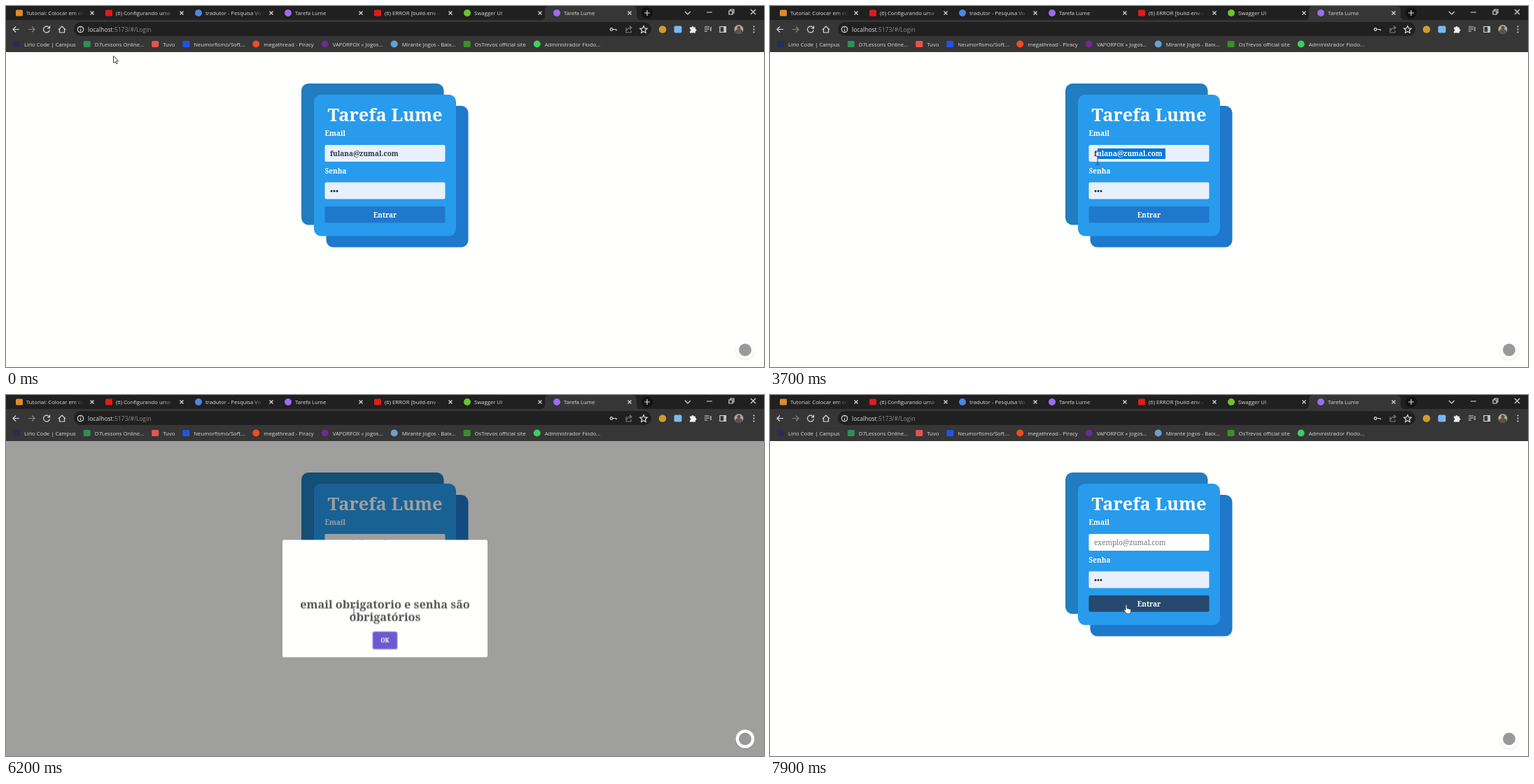
These frames come from a looping animation (1083 by 517 pixels, 8000 ms). An HTML page:

```html
<!DOCTYPE html>
<html lang="pt-BR">
<head>
<meta charset="utf-8">
<title>Login</title>
<style>
  html, body { margin: 0; width: 100%; height: 100%; overflow: hidden; background: #fffffd; }
  #stage { position: relative; width: 1083px; height: 517px; overflow: hidden; }
  #stage > * { position: absolute; left: 0; top: 0; }
  .ui { font: 7.7px "Open Sans", sans-serif; fill: #dcdcdc; }
  .line { fill: none; stroke: #dadada; stroke-width: 1.2; }
  .dim { stroke-opacity: .5; }
  .form { font: 600 10px "Noto Serif", serif; fill: #fff; }
  .form .title { font-size: 25.4px; text-anchor: middle; }
  .form .value { fill: #2f3540; }
  .form .hint { fill: #757575; font-weight: 500; }
  #enter { fill: #1f78cc; }
  #enter.hover { fill: #25496f; }
  #stage > #shade { top: 66px; width: 1083px; height: 451px; background: #000; opacity: 0; }
  #stage > #modal {
    left: 368px; top: 192px; width: 347px; height: 199px;
    border-radius: 3px; background: #fffffe; opacity: 0;
    font: 600 19.2px/22px "Noto Serif", serif; color: #545454; text-align: center;
  }
  #modal > * { position: absolute; }
  #icon { left: 141px; top: 22px; opacity: 0; }
  #mark { transform-origin: 32px 29px; }
  #message { left: 0; right: 0; top: 98px; white-space: nowrap; }
  #ok {
    left: 153px; top: 156px; width: 41px; height: 29px; border-radius: 3px;
    background: #6e59d0; box-shadow: 0 0 0 1px #6e59d066;
    color: #fff; font-size: 9.5px; line-height: 29px;
  }
  #ok.hover { background: #5843b0; }
  #ok.disabled { opacity: .4; }
  #cursor { width: 1px; height: 1px; overflow: visible; }
  #cursor path { fill: #fff; stroke: #444; stroke-linejoin: round; }
  #cursor #beam { fill: none; }
</style>
</head>
<body>
<div id="stage">
  <svg width="1083" height="517">
    <g class="ui">
      <rect width="1083" height="20" fill="#1f201f"/>
      <path d="M764 20q6 0 6-6V6q0-6 6-6h119q6 0 6 6v8q0 6 6 6z" fill="#353635"/>
      <rect y="20" width="1083" height="46" fill="#353635"/>
      <rect x="97" y="23" width="825" height="20" rx="10" fill="#1f201f"/>
      <g id="tabs"></g>
      <circle cx="916" cy="10" r="8" fill="#111211"/>
      <path class="line" d="M912 10h8M916 6v8M970 8l4 4 4-4M1001 9h8M1033 7h5v5h-5zM1035 7v-2h5v5h-2M1064 5l7 7m0-7l-7 7"/>
      <path class="line" d="M19 33.500h-9m4-4l-4 4 4 4M62 31.500a4.500 4.500 0 1 0 .4 3M62.500 28.500v3.500h-3.500M75 34l5-5 5 5M76.500 33v5h7v-5"/>
      <path class="line dim" d="M32 33.500h9m-4-4l4 4-4 4"/>
      <circle class="line" cx="106.500" cy="33.500" r="4.200"/>
      <path class="line" d="M106.500 33v3M106.500 30.700v1"/>
      <text x="117" y="37" font-size="8.5">localhost<tspan fill="#8d8f8d">:5173/#/Login</tspan></text>
      <circle class="line" cx="865" cy="33.500" r="1.800"/>
      <path class="line" d="M867 33.500h5v2"/>
      <path class="line dim" d="M886 31v7h7v-3M887 35q1-4 6-4M891 28.500l3 2.500-3 2.500"/>
      <path class="line" d="M911 28.500l1.500 3.400 3.700.3-2.800 2.500.9 3.700-3.300-2-3.300 2 .9-3.700-2.800-2.500 3.700-.3z"/>
      <circle cx="938" cy="33.500" r="5.300" fill="#d29a2d"/>
      <rect x="954.500" y="28.500" width="11" height="10" rx="2" fill="#78b8f4"/>
      <path fill="#f0f0f0" d="M977 30.500h2.500a1.500 1.500 0 0 1 3 0h2.500v2.500a1.500 1.500 0 0 1 0 3v2.500h-8v-2.500a1.500 1.500 0 0 0 0-3z"/>
      <path class="line" d="M998 30h7M998 33h7M998 36h4M1007 30v6M1020 29.500h8.500v8h-8.500zM1026 30v7M1027 30v7"/>
      <circle cx="1047" cy="33.500" r="6.500" fill="#a9aca4"/>
      <path fill="#5d5148" d="M1041.500 37a5.500 4 0 0 1 11 0 6.500 6.500 0 0 1-11 0z"/>
      <circle cx="1047" cy="31" r="2.500" fill="#5d5148"/>
      <path d="M1068.500 29.500v.1m0 3.900v.1m0 3.900v.1" stroke="#e4e4e4" stroke-width="2" stroke-linecap="round"/>
      <g id="marks"></g>
    </g>
    <g class="form">
      <rect x="422" y="111" width="203.500" height="202.500" rx="10" fill="#217dbf"/>
      <rect x="457.500" y="143" width="203" height="202.500" rx="10" fill="#1f78cc"/>
      <rect x="440" y="127" width="203" height="202.500" rx="10" fill="#289bec"/>
      <text class="title" x="541.500" y="165">Tarefa Lume</text>
      <text x="455.500" y="186">Email</text>
      <text x="455.500" y="239.500">Senha</text>
      <rect id="email" x="455.500" y="199" width="172" height="24" rx="2"/>
      <text id="hint" class="hint" x="463" y="215">exemplo@zumal.com</text>
      <text id="value" class="value" x="463" y="215">fulana@zumal.com</text>
      <g id="selection">
        <rect x="463" y="204" width="102" height="15" fill="#0078d7"/>
        <text x="463" y="215">fulana@zumal.com</text>
      </g>
      <path id="caret" d="M463.500 205v13" stroke="#222"/>
      <rect id="password" x="455.500" y="252.500" width="172" height="24" rx="2" fill="#e8f0fd"/>
      <path d="M465 265v.1m4-.1v.1m4-.1v.1" stroke="#222" stroke-width="3" stroke-linecap="round"/>
      <rect id="enter" x="455.500" y="287" width="172" height="23.500" rx="2"/>
      <text x="541.500" y="302.500" text-anchor="middle">Entrar</text>
    </g>
  </svg>
  <div id="shade"></div>
  <div id="modal">
    <svg id="icon" width="64" height="58">
      <ellipse cx="32" cy="29.500" rx="28.500" ry="25.500" fill="none" stroke="#f5cda9" stroke-width="2.600"/>
      <g id="mark" fill="#f0b17d"><path d="M29.800 15.500h4.400l-1.100 17h-2.200z"/><circle cx="32" cy="39.500" r="2.500"/></g>
    </svg>
    <div id="message">email obrigatorio e senha são<br>obrigatórios</div>
    <div id="ok">OK</div>
  </div>
  <svg width="1083" height="517">
    <circle cx="1056" cy="493.500" r="14" opacity=".08"/>
    <circle cx="1056" cy="492.500" r="13.300" fill="#fff"/>
    <circle cx="1056" cy="492.500" r="9" fill="#999"/>
  </svg>
  <svg id="cursor">
    <path id="arrow" d="M.5.5v10l2.400-2 1.500 3.500 1.700-.7-1.500-3.400h3z"/>
    <path id="beam" d="M-2.500-6h2l.5.600.5-.600h2M0-5.500v11M-2.500 6h2l.5-.600.5.600h2"/>
    <path id="hand" d="M-1 .500q1.200-1 2 .300v4.700l5 1.200q1 .4.800 1.500l-.8 5h-5.500l-4-5q.5-1.500 2.500 0z"/>
  </svg>
</div>
<script>
const LOOP = 8000, STEP = 100;
const DRAG = 3200, DROP = 3800, CLEAR = 5100, OPEN = 6167, CLOSE = 7350;
const $ = id => document.getElementById(id);

// Browser chrome
const badge = (x, y, color, round) => round
  ? `<circle cx="${x}" cy="${y}" r="5" fill="${color}"/>`
  : `<rect x="${x - 5}" y="${y - 4.5}" width="10" height="9" rx="1.5" fill="${color}"/>`;

const tabs = [
  ['Tutorial: Colocar em co', '#e08a2c'], ['(6) Configurando uma', '#e01b1b'],
  ['tradutor - Pesquisa Vo', '#4a86e8', true], ['Tarefa Lume', '#9a6cf0', true],
  ['(6) ERROR [build-env -', '#e01b1b'], ['Swagger UI', '#6cc52c', true], ['Tarefa Lume', '#9a6cf0', true]
];
$('tabs').innerHTML = `<linearGradient id="fade">
  <stop offset="0" stop-color="#1f201f" stop-opacity="0"/><stop offset=".8" stop-color="#1f201f"/>
  </linearGradient>` + tabs.map(([label, color, round], i) => {
  const x = 128 * i, active = i === tabs.length - 1;
  return badge(x + 19, 10, color, round) + `<text x="${x + 29}" y="13">${label}</text>` +
    (active ? '' : `<rect x="${x + 96}" y="2" width="20" height="16" fill="url(#fade)"/>`) +
    `<path class="line" d="M${x + 120.5} 7.500l5 5m0-5l-5 5"/>`;
}).join('');

const marks = [
  ['Lirio Code | Campus', '#2c2c58'], ['D7Lessons Online...', '#2f8f55'], ['Tuvo', '#e6544c'],
  ['Neumorfismo/Soft...', '#2453e4'], ['megathread - Piracy', '#f04b23', true],
  ['VAPORFOX » Jogos...', '#6d2a92', true], ['Mirante Jogos - Baix...', '#6b9fd0', true],
  ['OsTrevos official site', '#3a8f2b'], ['Administrador Fiodo...', '#3fce5c', true]
];
let markX = 15;
for (const [label, color, round] of marks) {
  $('marks').insertAdjacentHTML('beforeend',
    badge(markX, 54.5, color, round) + `<text x="${markX + 11}" y="57.5">${label}</text>`);
  markX += 27 + $('marks').lastElementChild.getComputedTextLength();
}

// Dialog: opening and closing
const animations = [];
function play(id, delay, duration, frames) {
  const a = $(id).animate({ easing: 'ease', ...frames }, { delay, duration, fill: 'forwards' });
  a.pause();
  animations.push(a);
}
play('shade', OPEN - 36, 100, { opacity: [0, .4] });
play('shade', CLOSE, 100, { opacity: [.4, 0] });
play('modal', OPEN, 300, {
  transform: [.7, 1.05, .95, 1].map(s => `scale(${s})`), offset: [0, .45, .8, 1]
});
play('modal', OPEN, 300, { opacity: [1, 1] });
play('modal', CLOSE, 150, { transform: ['scale(1)', 'scale(.5)'], opacity: [1, 0] });
play('icon', OPEN, 500, { transform: ['rotateX(100deg)', 'rotateX(0deg)'], opacity: [0, 1] });
play('mark', OPEN, 500, { transform: [45, -25, 15, -5, 0].map(deg => `rotate(${deg}deg)`) });

// Pointer stops: x, y, arrival and departure in ms
const stops = [
  [153, 71, 0, 0], [410, 284, 300, 300], [760, 190, 600, 700], [475, 134, 1100, 1100],
  [867, 203, 1600, 1800], [696, 212, 2300, 2400], [597, 210, 3100, DRAG], [458, 222, DROP, 4100],
  [446, 214, 4300, 4400], [471, 216, 4700, CLEAR], [497, 309, 5900, 6200], [535, 363, 7100, 7300],
  [530, 364, 7400, 7400], [509, 300, 7900, LOOP]
];
function pointer(t) {
  const i = stops.findIndex(stop => t <= stop[3]);
  const [x, y, arrive] = stops[i];
  if (t >= arrive) return [x, y];
  const [px, py, , leave] = stops[i - 1];
  const u = (t - leave) / (arrive - leave), e = u * u * (3 - 2 * u);
  return [px + (x - px) * e, py + (y - py) * e];
}

const boxes = {};
for (const id of ['email', 'password', 'enter', 'message', 'ok']) boxes[id] = $(id).getBoundingClientRect();
const show = (id, on) => { $(id).style.visibility = on ? 'visible' : 'hidden'; };

function render(t) {
  for (const a of animations) a.currentTime = t;

  const [x, y] = pointer(t);
  const open = t >= OPEN && t < CLOSE;
  const over = id => {
    const b = boxes[id];
    return x >= b.left && x <= b.right && y >= b.top && y <= b.bottom;
  };
  const dragging = t >= DRAG && t < DROP;
  const hand = over(open ? 'ok' : 'enter');
  const beam = dragging || (open ? over('message') : over('email') || over('password'));
  $('cursor').style.transform = `translate(${x}px, ${y}px)`;
  show('hand', hand);
  show('beam', beam);
  show('arrow', !hand && !beam);
  $('enter').classList.toggle('hover', hand && !open);
  $('ok').classList.toggle('hover', hand && open);
  $('ok').classList.toggle('disabled', t >= CLOSE);

  const filled = t < CLEAR;
  $('email').style.fill = filled ? '#e8f0fd' : '#fff';
  show('value', filled);
  show('hint', !filled);
  show('caret', t >= CLEAR && t < CLEAR + 500);
  show('selection', t > DRAG && filled);
  const from = Math.max(463, pointer(Math.min(t, DROP))[0]);
  $('selection').style.clipPath = `inset(0 0 0 ${Math.min(102, from - 463)}px)`;
}

const start = performance.now();
function tick() {
  const t = (performance.now() - start) % LOOP;
  render(Math.floor(t / STEP) * STEP + 1);
  requestAnimationFrame(tick);
}
tick();
</script>
</body>
</html>
```
